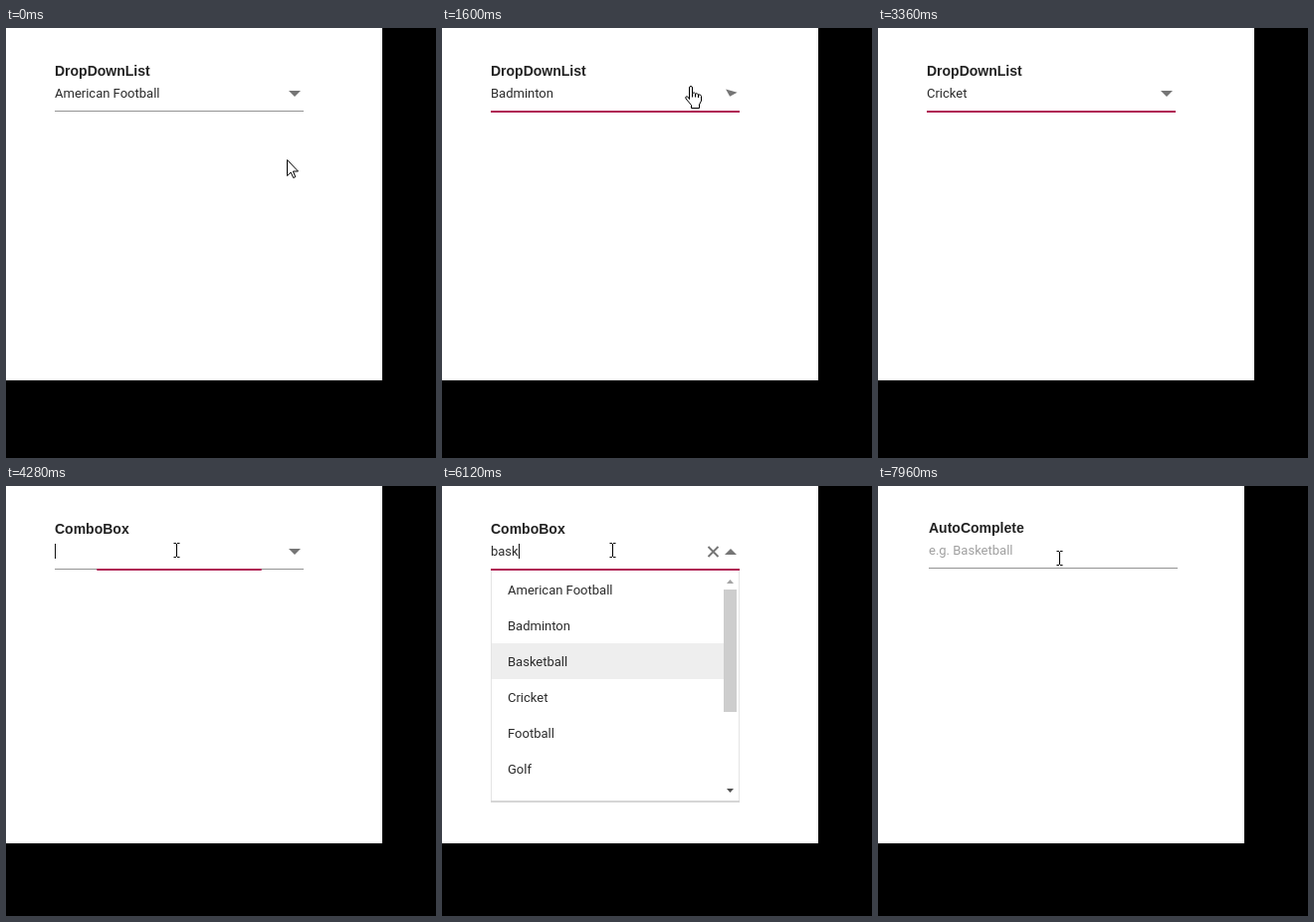
Write an HTML page that moves like this. It is 432 px wide and 432 px high and loops after 8 s.

```html
<!DOCTYPE html>
<html lang="en">
<head>
<meta charset="utf-8">
<title>Dropdown components</title>
<style>
  html, body { margin: 0; width: 100%; height: 100%; overflow: hidden; background: #000; }
  svg { display: block; width: 432px; height: 432px; }
  text { font: 13px Roboto, sans-serif; fill: #2b2b2b; white-space: pre; }
  #title { font: bold 14px "Liberation Sans", Arial, sans-serif; fill: #222; }
  #cursor path { fill: none; stroke: #000; stroke-linejoin: round; }
  #cursor .solid { fill: #fff; }
</style>
</head>
<body>
<svg viewBox="0 0 432 432">
  <rect width="432" height="432"/>
  <rect id="page" fill="#fff"/>
  <g id="field">
    <text id="title" x="49" y="48"></text>
    <text id="value" x="49" y="70"></text>
    <rect id="caret" y="58" width="1" height="15" fill="#111"/>
    <rect x="49" y="83" width="250" height="1" fill="#949494"/>
    <rect id="focus" y="83" height="2" fill="#b02055"/>
    <path id="clear" d="M267.5 61l10 10m0-10l-10 10" stroke="#757575" stroke-width="1.9"/>
    <path id="arrow" d="M284 63h12l-6 6z" fill="#757575"/>
  </g>
  <g id="popup">
    <rect id="shade" x="49" y="85" width="250" fill="#e4e4e4"/>
    <rect id="edge" x="49" width="250" height="2" fill="#d6d6d6"/>
    <rect id="sheet" x="50" y="85" width="248" fill="#fff"/>
    <clipPath id="clip"><rect id="window" x="50" y="86" width="248"/></clipPath>
    <g clip-path="url(#clip)">
      <rect id="hover" x="50" width="233" height="36" fill="#eee"/>
      <g id="items"></g>
    </g>
    <path d="M286 98h7l-3.5-4z" fill="#a3a3a3"/>
    <rect id="thumb" x="283" y="104" width="13" fill="#cdcdcd"/>
    <path id="down" d="M286 0h7l-3.5 4z" fill="#505050"/>
  </g>
  <g id="cursor">
    <path id="pointer" class="solid" d="M.5.5V16.5L4.2 13L6.7 18.5L8.8 17.6L6.4 12H11.5Z"/>
    <path id="hand" class="solid" d="M4.5 13.5V2Q4.5.5 6 .5T7.5 2V7.5Q9.5 6 10.5 8Q12.7 7 13.5 9Q16 8.3 16.5 10.5V15L14.5 19V22.5H6.5V19.5L1 13Q0 11 2 10.7Q3.5 11 4.5 13.5ZM7.5 7.5V11.5M10.5 8V11.5M13.5 9V12"/>
    <path id="ibeam" d="M-2.5-6.5H0M1-6.5H3.5M.5-6V7M-2.5 7.5H0M1 7.5H3.5"/>
  </g>
</svg>
<script>
const LOOP = 8000;
const GAMES = ["American Football", "Badminton", "Basketball", "Cricket", "Football", "Golf"];
const COMBO = 3640, AUTO = 7880;

// Step tables: [start, value]
const VALUES = [[0, GAMES[0]], [1360, GAMES[1]], [2120, GAMES[2]], [2360, GAMES[3]],
  [COMBO, ""], [5000, "b"], [5280, "ba"], [5680, "bas"], [6000, "bask"], [6160, "baske"],
  [6560, GAMES[2]], [AUTO, "e.g. Basketball"]];
const CARET = [[0, 0], [4160, 1], [4680, 0], [5000, 1], [7080, 0], [7560, 1], [AUTO, 0]];
const HOVER = [[0, -1], [1200, 1], [1500, -1], [5400, 1], [5680, 2]];
const OPENINGS = [[780, 1360], [1660, 2520], [5000, 6540]];
const FOCUS = [[760, COMBO], [4160, AUTO]];

// [time, x, y, shape]; the shape holds until the next entry
const MOUSE = [[0, 282, 132, "pointer"], [20, 282, 132, "pointer"], [200, 316, 152, "pointer"],
  [400, 262, 82, "hand"], [480, 250, 63, "hand"], [880, 250, 63, "hand"],
  [1160, 236, 124, "hand"], [1340, 237, 126, "hand"], [1590, 244, 58, "hand"],
  [2120, 244, 58, ""], [COMBO, 200, 330, "pointer"], [3960, 174, 86, "ibeam"],
  [4040, 171, 64, "ibeam"], [7060, 171, 64, "ibeam"], [7120, 173, 86, "pointer"],
  [7400, 187, 335, "pointer"], [7860, 187, 335, "pointer"], [7880, 184, 100, "pointer"],
  [7920, 182, 80, "ibeam"], [7950, 182, 72, "ibeam"]];

const $ = id => document.getElementById(id);
const set = (id, attrs) => { for (const k in attrs) $(id).setAttribute(k, attrs[k]); };
const show = (id, on) => set(id, { visibility: on ? "visible" : "hidden" });
const ramp = (t, start, span) => Math.min(1, Math.max(0, (t - start) / span));
const ease = p => (1 - Math.cos(Math.PI * p)) / 2;
const indexAt = (t, table) => table.findLastIndex(row => row[0] <= t);
const at = (t, table) => table[indexAt(t, table)][1];
const setText = (el, s) => { if (el.textContent !== s) el.textContent = s; };

// 0 closed to 1 open, for the interval in progress
const openness = (t, span) => Math.max(...OPENINGS.map(([a, b]) =>
  ease(ramp(t, a, span)) * (1 - ease(ramp(t, b, span)))));

const rows = GAMES.map((name, i) => {
  const row = document.createElementNS("http://www.w3.org/2000/svg", "text");
  row.setAttribute("x", 66);
  row.setAttribute("y", 109 + 36 * i);
  row.textContent = name;
  $("items").append(row);
  return row;
});

function drawField(t) {
  const combo = t >= COMBO, auto = t >= AUTO;
  const value = at(t, VALUES);
  set("page", { width: auto ? 368 : 378, height: combo ? 359 : 354 });
  set("field", { transform: auto ? "translate(2 -1)" : "" });
  setText($("title"), auto ? "AutoComplete" : combo ? "ComboBox" : "DropDownList");
  setText($("value"), value);
  $("value").style.fill = auto ? "#a0a0a0" : "";
  const width = value ? $("value").getComputedTextLength() : 0;
  set("caret", { x: Math.round(49 + width) });
  show("caret", at(t, CARET));
  const span = FOCUS.find(([a, b]) => t >= a && t < b);
  const half = span ? 125 * ease(ramp(t, span[0], 200)) : 0;
  set("focus", { x: 174 - half, width: 2 * half });
  show("clear", combo && !auto && value);
  show("arrow", !auto);
  set("arrow", { transform: `rotate(${180 * openness(t, 300)} 290 66)` });
}

function drawPopup(t) {
  const combo = t >= COMBO;
  const bottom = combo ? 316 : 286;
  const hover = at(t, HOVER);
  const active = combo ? -1 : GAMES.indexOf(at(t, VALUES));
  set("popup", { opacity: openness(t, 120) });
  set("shade", { height: bottom - 85 });
  set("edge", { y: bottom });
  set("sheet", { height: bottom - 85 });
  set("window", { height: bottom - 87 });
  set("thumb", { height: combo ? 123 : 90 });
  set("down", { transform: `translate(0 ${bottom - 12})` });
  set("hover", { y: 86 + 36 * hover });
  show("hover", hover >= 0);
  rows.forEach((row, i) => row.style.fill = i === active ? "#d0285f" : "");
}

function drawMouse(t) {
  const i = indexAt(t, MOUSE);
  const [t0, x0, y0, shape] = MOUSE[i];
  const [t1, x1, y1] = MOUSE[i + 1] || [LOOP, x0, y0];
  const p = ease(ramp(t, t0, t1 - t0));
  const x = Math.round(x0 + (x1 - x0) * p), y = Math.round(y0 + (y1 - y0) * p);
  set("cursor", { transform: `translate(${x} ${y})` });
  for (const id of ["pointer", "hand", "ibeam"]) show(id, id === shape);
}

const begin = performance.now();
function draw(now) {
  const t = Math.max(0, now - begin) % LOOP;
  drawField(t);
  drawPopup(t);
  drawMouse(t);
  requestAnimationFrame(draw);
}
draw(begin);
</script>
</body>
</html>
```
